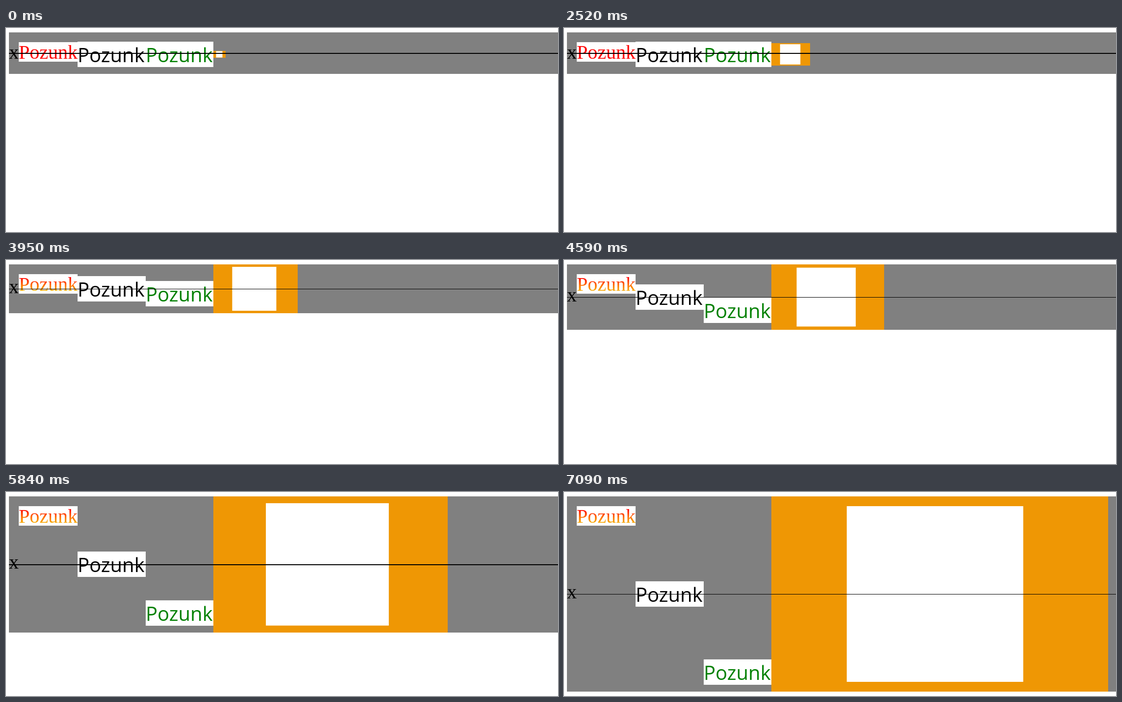
An HTML page for the animation above (8320 ms loop, 1126x418 px).

```html
<!DOCTYPE html>
<html lang="en">
<head>
<meta charset="utf-8">
<title>Vertical align</title>
<style>
  html, body { margin: 0; width: 100%; height: 100%; overflow: hidden; background: #fff; }
  svg { display: block; }
  text { font: 40px "Open Sans", "Noto Sans", sans-serif; }
  .serif { font-family: "Liberation Serif", serif; }
</style>
</head>
<body>
<svg width="1126" height="418" viewBox="0 0 1126 418">
  <defs>
    <linearGradient id="warm" gradientUnits="userSpaceOnUse" x1="0" y1="36" x2="0" y2="64">
      <stop offset="0" stop-color="#f00"/>
      <stop offset=".6" stop-color="#f70"/>
      <stop offset="1" stop-color="#f5b000"/>
    </linearGradient>
  </defs>
  <rect id="bar" x="6" y="9" width="1120" fill="#808080"/>
  <text id="ex" class="serif" x="6">x</text>
  <rect x="26" y="29" width="120" height="40" fill="#fff"/>
  <text id="top" class="serif" x="26" y="63">Pozunk</text>
  <g id="middle">
    <rect x="146" width="139" height="52" fill="#fff"/>
    <text x="146" y="42">Pozunk</text>
  </g>
  <g id="bottom">
    <rect x="285" width="138" height="52" fill="#fff"/>
    <text x="285" y="42" fill="#008000">Pozunk</text>
  </g>
  <rect id="picture" x="423" fill="#ef9704"/>
  <rect id="mark" fill="#fff"/>
  <rect id="line" x="6" width="1120"/>
</svg>
<script>
const LOOP = 8320, START = 1360, STEP = 78.4;
const TOP = 9, LEFT = 423, RATIO = 1.717;

// picture height at a few steps; it zooms by a steady factor in between
const keys = [[-1, 14.4], [6, 31.3], [33, 100], [41, 134], [63, 366.6], [73, 400]];

const set = (id, attrs) => {
  for (const k in attrs) document.getElementById(id).setAttribute(k, attrs[k]);
};

function heightAt(t) {
  const n = Math.min(73, Math.max(-1, Math.floor((t - START) / STEP + .22)));
  const i = keys.findIndex(k => k[0] >= n);
  if (i === 0) return keys[0][1];
  const [n0, h0] = keys[i - 1], [n1, h1] = keys[i];
  return h0 * (h1 / h0) ** ((n - n0) / (n1 - n0));
}

function draw(t) {
  const h = heightAt(t), w = h * RATIO, r = Math.round;
  const above = Math.max(45, h / 2), below = Math.max(39.6, h / 2);
  const mid = TOP + above, end = mid + below;
  const picTop = r(mid - h / 2), lineY = (TOP + end) / 2, side = h * .9;

  set("bar", { height: r(end) - TOP });
  set("ex", { y: r(mid) + 9 });
  set("top", { fill: h > 80 ? "url(#warm)" : "#f00" });
  set("middle", { transform: `translate(0 ${r(mid - 26)})` });
  set("bottom", { transform: `translate(0 ${r(end - 14) - 52})` });
  set("picture", { y: picTop, width: r(LEFT + w) - LEFT, height: r(mid + h / 2) - picTop });
  set("mark", { x: LEFT + w * .486 - side / 2, y: mid - side / 2, width: side, height: side });
  // a 1.25 px line snapped to whole pixels
  set("line", { y: r(lineY), height: r(lineY + 1.25) - r(lineY) });
}

const start = performance.now();
function tick() {
  draw((performance.now() - start) % LOOP);
  requestAnimationFrame(tick);
}
tick();
</script>
</body>
</html>
```
